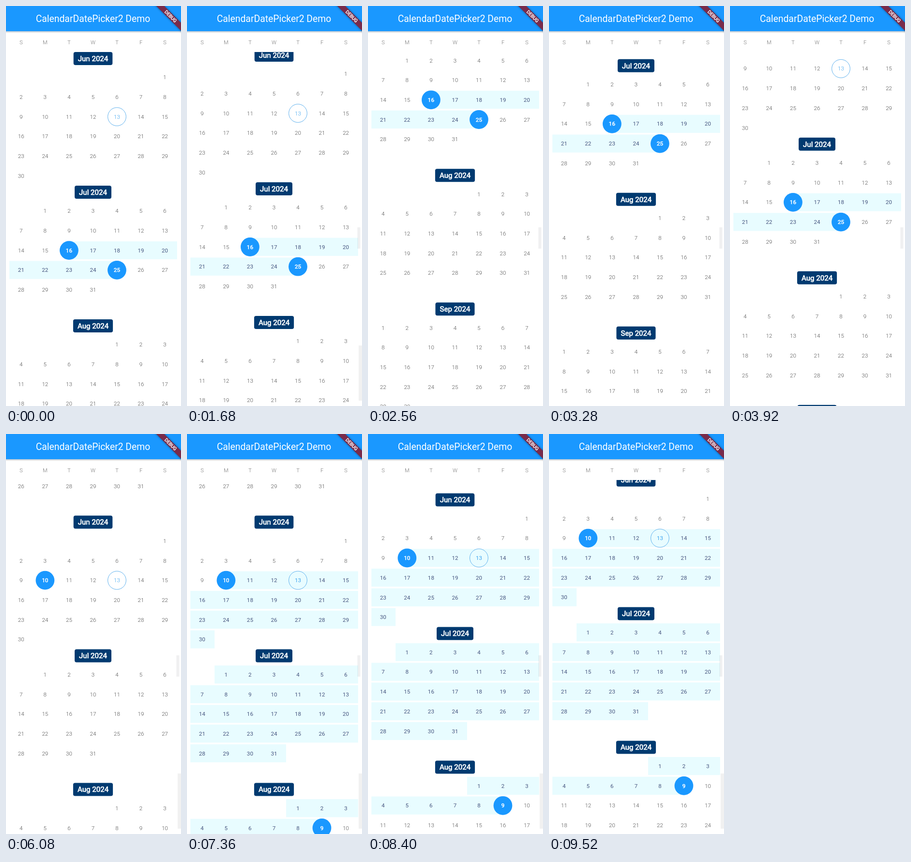
Write an HTML page with a canvas that moves like this. It is 362 px wide and 826 px high and loops after 9600 ms.

```html
<!DOCTYPE html>
<html lang="en">
<head>
<meta charset="utf-8">
<title>Calendar range picker</title>
<style>
  html, body { margin: 0; height: 100%; overflow: hidden; background: #fff; }
  canvas { display: block; }
</style>
</head>
<body>
<canvas id="stage" width="362" height="826"></canvas>
<script>
const ctx = document.getElementById('stage').getContext('2d');
const W = 362, H = 826, LOOP = 9600, STEP = 80;
const BLUE = '#1a98ff', NAVY = '#003a70', BAND = '#e8fcff';
const LEFT = 7, CELL = 49.55, ROW = 40.7, MONTH = 276, LIST_TOP = 95;
const MONTHS = ['May', 'Jun', 'Jul', 'Aug', 'Sep', 'Oct'];
const TODAY = 613;

// Dates are written as month * 100 + day.
const selections = [
  { from: 0, start: 716, end: 725 },
  { from: 5440, start: 610, end: 610 },
  { from: 6400, start: 610, end: 809 },
];
const scrolls = [
  { from: 1586, to: 2640, delta: 316 },
  { from: 2780, to: 4900, delta: -389.5 },
  { from: 7880, to: 8880, delta: 87 },
];

function smooth(t, from, to) {
  const u = Math.min(1, Math.max(0, (t - from) / (to - from)));
  return u * u * (3 - 2 * u);
}

// Bold is the regular face with a thin outline, as the app renders it.
function text(str, x, y, size, color, { bold = false, weight = 400 } = {}) {
  ctx.font = `${weight} ${size}px Roboto, sans-serif`;
  ctx.fillStyle = ctx.strokeStyle = color;
  ctx.fillText(str, x, y + size * 0.355);
  if (bold) {
    ctx.lineWidth = size / 22;
    ctx.strokeText(str, x, y + size * 0.355);
  }
  return ctx.measureText(str).width;
}

function rect(x, y, w, h, color, radius = 0) {
  ctx.fillStyle = color;
  ctx.beginPath();
  ctx.roundRect(x, y, w, h, radius);
  ctx.fill();
}

function circle(x, y, radius) {
  ctx.beginPath();
  ctx.arc(x, y, radius, 0, 7);
}

function drawDay(date, col, y, { start, end }) {
  const x = LEFT + (col + 0.5) * CELL - 0.5;
  const picked = date === start || date === end;
  const inRange = date >= start && date <= end;
  if (picked) {
    ctx.fillStyle = BLUE;
    circle(x, y, 19.4);
    ctx.fill();
  } else if (date === TODAY) {
    ctx.strokeStyle = '#5fb1ee';
    ctx.lineWidth = 1;
    circle(x, y, 18.9);
    ctx.stroke();
  }
  const color = picked ? '#fff' : date === TODAY ? '#3ba3ef' : inRange ? '#46557f' : '#505050';
  text(date % 100, x, y, 11.6, color, { bold: picked, weight: inRange ? 400 : 300 });
}

function drawBand(date, col, y, { start, end }) {
  if (start === end || date < start || date > end) return;
  const left = LEFT + (col + (date === start ? 0.5 : 0)) * CELL;
  const right = LEFT + (col + (date === end ? 0.5 : 1)) * CELL;
  rect(Math.round(left), y - 18.7, Math.round(right) - Math.round(left), 37.2, BAND);
}

function drawMonth(index, top, range) {
  const month = index + 5;
  const label = `${MONTHS[index]} 2024`;
  ctx.font = '400 15.1px Roboto, sans-serif';
  const width = ctx.measureText(label).width + 18;
  rect(180 - width / 2, top - 13.4, width, 27, NAVY, 4);
  text(label, 180, top, 15.1, '#fff', { bold: true });

  const offset = new Date(2024, month - 1, 1).getDay();
  const days = new Date(2024, month, 0).getDate();
  for (const drawPart of [drawBand, drawDay]) {
    for (let d = 1; d <= days; d++) {
      const cell = offset + d - 1;
      drawPart(month * 100 + d, cell % 7, top + 38.8 + Math.floor(cell / 7) * ROW, range);
    }
  }
}

function drawHeader() {
  const shadow = ctx.createLinearGradient(0, 52, 0, 56);
  shadow.addColorStop(0, '#bbc4cc');
  shadow.addColorStop(1, '#fff');
  rect(0, 52, W, 4, shadow);
  rect(0, 0, W, 52, BLUE);
  text('CalendarDatePicker2 Demo', 180, 26.5, 19.35, '#fff');
  [...'SMTWTFS'].forEach((s, i) =>
    text(s, LEFT + (i + 0.5) * CELL - 0.5, 75, 11.2, '#757575', { weight: 300 }));

  ctx.save();
  ctx.translate(W, 0);
  ctx.rotate(Math.PI / 4);
  ctx.shadowColor = 'rgba(0,0,0,.5)';
  ctx.shadowBlur = 4;
  rect(-50, 24.5, 100, 11.6, '#792b4b');
  ctx.shadowColor = 'transparent';
  text('DEBUG', 0, 30.2, 9.8, '#fff', { bold: true });
  ctx.restore();
}

function draw(t) {
  const scroll = scrolls.reduce((sum, s) => sum + s.delta * smooth(t, s.from, s.to), 0);
  const range = selections.filter(s => t >= s.from).pop();
  ctx.textAlign = 'center';
  rect(0, 0, W, H, '#fff');

  ctx.save();
  ctx.beginPath();
  ctx.rect(0, LIST_TOP, W, H - LIST_TOP);
  ctx.clip();
  MONTHS.forEach((_, i) => drawMonth(i, 108.4 + (i - 1) * MONTH - scroll, range));
  ctx.restore();

  if (t >= 1680) rect(352.5, 457, 6, 44, 'rgba(120,120,130,.11)');
  if ((t >= 1680 && t < 2240) || t >= 6000) rect(355, 701, 7, 114, 'rgba(120,120,120,.1)');
  drawHeader();
}

function tick() {
  draw(Math.floor((performance.now() % LOOP) / STEP) * STEP);
  requestAnimationFrame(tick);
}
tick();
</script>
</body>
</html>
```
